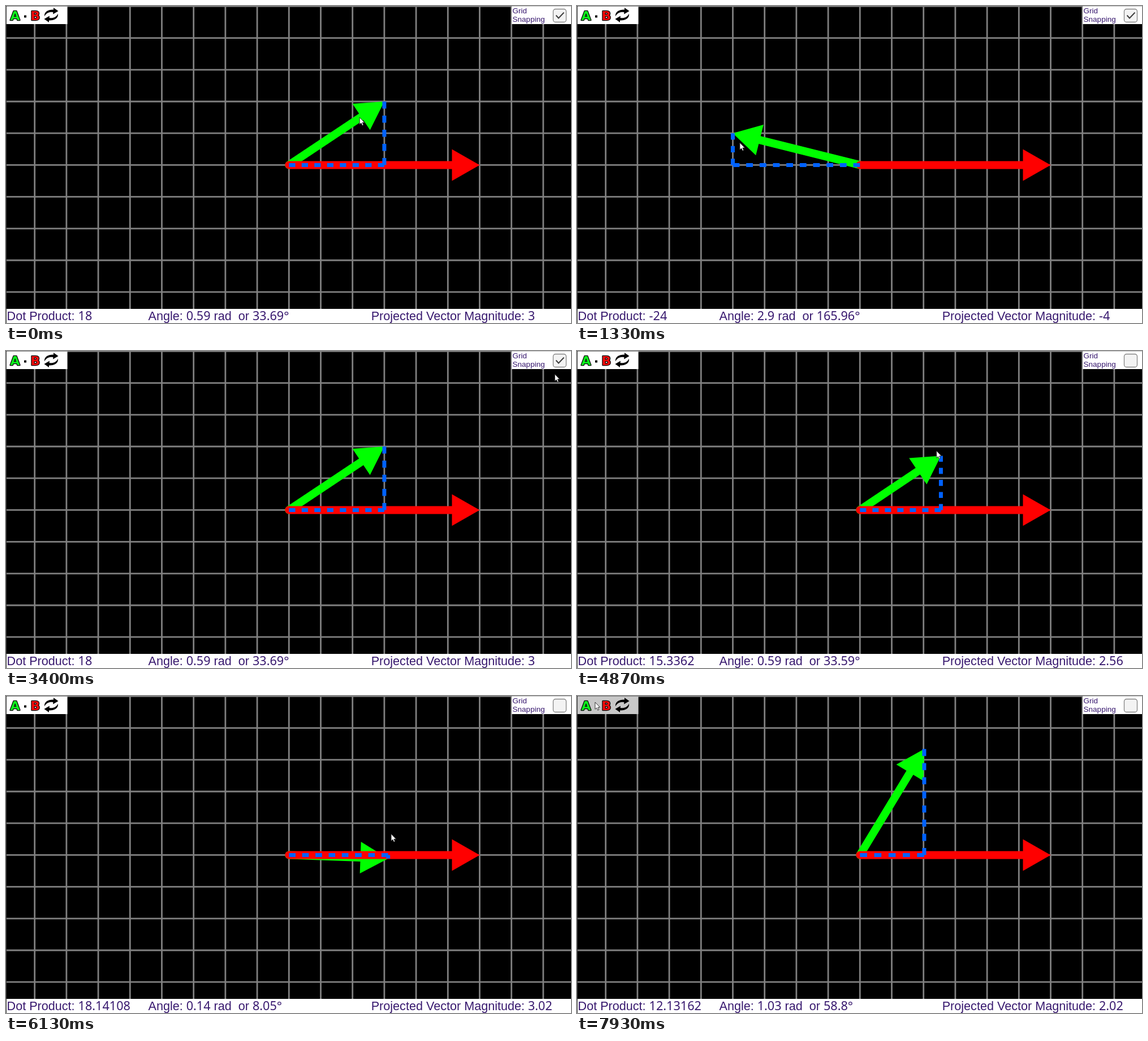
These frames come from a looping animation (999x561 px, 8 s). An HTML page with a canvas:

```html
<!DOCTYPE html>
<html lang="en">
<head>
<meta charset="utf-8">
<title>Dot product</title>
<style>
  html, body { margin: 0; width: 100%; height: 100%; overflow: hidden; background: #000; }
  canvas { display: block; }
</style>
</head>
<body>
<canvas id="stage" width="999" height="561"></canvas>
<script>
const ctx = document.getElementById('stage').getContext('2d');
const W = 999, H = 561, LOOP = 8000, STEP = 200 / 3;
const CX = 500.3, CY = 281.4, U = 56.2, B_LEN = 6;
const INK = '#38196f', BLUE = '#0062ff', GRID = '#808080';
const LAG = 60, TEXT_LAG = 85;
const GRAB = 400, UNCHECK = 3670, REGRAB = 4470;

const mix = (a, b, s) => a + (b - a) * s;
const clamp = (v, lo, hi) => Math.min(Math.max(v, lo), hi);
const smooth = s => s * s * (3 - 2 * s);
const rad = deg => deg * Math.PI / 180;
const polar = (deg, r) => [CX + r * Math.cos(rad(deg)), CY - r * Math.sin(rad(deg))];

// Angle and radius of the vector with a given dot product
const spot = (dot, deg) => [deg, dot / B_LEN * U / Math.cos(rad(deg))];

// Monotone cubic through keys [time, value, value]: still at both ends
function curve(keys, t, k) {
  const slope = i => {
    if (i === 0 || i === keys.length - 1) return 0;
    const [p, q, r] = keys.slice(i - 1, i + 2);
    const a = (q[k] - p[k]) / (q[0] - p[0]), b = (r[k] - q[k]) / (r[0] - q[0]);
    return a * b <= 0 ? 0 : 2 * a * b / (a + b);
  };
  let i = 0;
  while (i < keys.length - 2 && keys[i + 1][0] <= t) i++;
  const p = keys[i], q = keys[i + 1], h = q[0] - p[0], s = (t - p[0]) / h;
  return mix(p[k], q[k], smooth(s)) +
    h * s * (1 - s) * (slope(i) * (1 - s) - slope(i + 1) * s);
}

// Pointer moves: straight or bowed glides, and drags around the centre
const glide = (from, to, end, bow = 0) => ({
  from,
  run(t, pos) {
    const s = smooth(Math.min((t - from) / (to - from), 1));
    return [mix(pos[0], end[0], s), mix(pos[1], end[1], s) + bow * Math.sin(Math.PI * s)];
  }
});
const orbit = (...keys) => ({
  from: keys[0][0],
  run(t) {
    const at = Math.min(t, keys[keys.length - 1][0]);
    return polar(curve(keys, at, 1), curve(keys, at, 2));
  }
});

const HOME = [625.2, 197.2];
const LOOSE = spot(15.3362, 33.59);
const moves = [
  glide(60, 200, polar(34, 171)),
  orbit([340, 34, 171], [1330, 169.5, 216], [2200, 321.5, 198], [2800, 395.7, 214]),
  glide(2940, 3200, [968, 48]),
  glide(3340, 3530, [978, 18]),
  glide(3740, 4200, [626, 169]),
  glide(4210, 4330, [645, 182]),
  glide(4400, 4510, polar(...LOOSE)),
  orbit([4790, ...LOOSE], [5585, ...spot(-7.668098, 234.81)], [6510, ...spot(12.13162, 418.8)]),
  glide(6810, 7670, [32, 11], 245)
];
function pointer(t) {
  let pos = HOME;
  for (const m of moves) if (t > m.from) pos = m.run(t, pos);
  return pos;
}

// Vector A in grid units
function vectorAt(t, lag) {
  if (t < GRAB) return [3, 2];
  const free = t >= REGRAB;
  const [px, py] = pointer(free ? Math.min(t - lag, 6520) : Math.min(t, 2860));
  const v = [(px - CX) / U, (CY - py) / U];
  return free ? v : v.map(Math.round);
}

function line(x1, y1, x2, y2) {
  ctx.beginPath();
  ctx.moveTo(x1, y1);
  ctx.lineTo(x2, y2);
  ctx.stroke();
}
function poly(points, color) {
  ctx.beginPath();
  points.forEach(p => ctx.lineTo(...p));
  ctx.closePath();
  ctx.fillStyle = color;
  ctx.fill();
}

function grid() {
  ctx.fillStyle = '#000';
  ctx.fillRect(0, 0, W, H);
  ctx.strokeStyle = GRID;
  ctx.lineWidth = 2.8;
  for (let i = -8; i <= 8; i++) line(CX + i * U, 0, CX + i * U, H);
  for (let i = -5; i <= 4; i++) line(0, CY + i * U, W, CY + i * U);
}

function arrow(x, y, color) {
  const len = Math.hypot(x, y) * U, neck = len - 49;
  ctx.save();
  ctx.translate(CX, CY);
  ctx.rotate(-Math.atan2(y, x));
  ctx.strokeStyle = color;
  ctx.lineWidth = 14;
  ctx.beginPath();
  ctx.arc(0, 0, 7, 0, 7);
  ctx.fillStyle = color;
  ctx.fill();
  line(0, 0, Math.max(neck, 0) + 1, 0);
  poly([[neck, -28], [len, 0], [neck, 28]], color);
  ctx.restore();
}

// Dashes fill the length so that both ends carry a dash
function dashes(x1, y1, x2, y2) {
  const len = Math.hypot(x2 - x1, y2 - y1);
  if (len < 0.5) return;
  const dash = len / (2 * Math.floor(len / 23.6) + 1);
  ctx.strokeStyle = BLUE;
  ctx.lineWidth = 7;
  ctx.setLineDash([dash, dash]);
  line(x1, y1, x2, y2);
  ctx.setLineDash([]);
}

// Letters and figures use two typefaces
function caption(text, x) {
  ctx.fillStyle = INK;
  for (const run of text.match(/[\d.°-]+|[^\d.°-]+/g)) {
    ctx.font = '21.6px ' + (/\d/.test(run) ? '"Noto Sans", "Open Sans"' : '"Liberation Sans", Arial') + ', sans-serif';
    ctx.fillText(run, x, 556);
    x += ctx.measureText(run).width;
  }
}
const short = v => Number(v.toFixed(2));

function readout([x, y]) {
  ctx.fillStyle = '#fff';
  ctx.fillRect(0, 536, W, 25);
  const angle = Math.atan2(Math.abs(y), x);
  caption(`Dot Product: ${Number((x * B_LEN).toPrecision(7))}`, 1.6);
  caption(`Angle: ${short(angle)} rad  or ${short(angle * 180 / Math.PI)}°`, 251.5);
  caption(`Projected Vector Magnitude: ${short(x)}`, 645.7);
}

function letter(ch, x, color) {
  ctx.font = 'bold 22px "DejaVu Sans", sans-serif';
  ctx.lineJoin = 'round';
  ctx.lineWidth = 2.4;
  ctx.strokeStyle = '#000';
  ctx.strokeText(ch, x, 25);
  ctx.fillStyle = color;
  ctx.fillText(ch, x, 25);
}

function swapIcon() {
  for (const turn of [0, Math.PI]) {
    ctx.save();
    ctx.translate(80, 16);
    ctx.rotate(turn);
    ctx.beginPath();
    ctx.moveTo(-12, 2.5);
    ctx.bezierCurveTo(-13, -6, -5, -10, 4, -9.5);
    ctx.lineTo(4, -13);
    ctx.lineTo(12.5, -7);
    ctx.lineTo(3, -1.5);
    ctx.lineTo(3.4, -5);
    ctx.bezierCurveTo(-3, -6, -9, -4, -12, 2.5);
    ctx.fillStyle = '#000';
    ctx.fill();
    ctx.restore();
  }
}

function modeButton(t) {
  const tone = Math.round(mix(255, 200, clamp((t - 7670) / 260, 0, 1)));
  ctx.fillStyle = `rgb(${tone},${tone},${tone})`;
  ctx.fillRect(1, 1, 107.5, 31);
  letter('A', 7.5, '#0cf01c');
  letter('B', 43.5, '#f00c0c');
  ctx.fillStyle = '#000';
  ctx.fillRect(32, 16.5, 4, 4);
  swapIcon();
}

function snapPanel(t) {
  ctx.fillStyle = '#fff';
  ctx.fillRect(894.2, 0.5, 104.8, 31.5);
  ctx.fillStyle = INK;
  ctx.font = '13.5px "Liberation Sans", Arial, sans-serif';
  ctx.fillText('Grid', 895.6, 13);
  ctx.fillText('Snapping', 895.6, 28);
  ctx.beginPath();
  ctx.roundRect(967.5, 5.5, 23, 23, 4);
  ctx.fillStyle = t >= 3470 && t < REGRAB ? '#e9e9e9' : '#f3f3f3';
  ctx.fill();
  ctx.strokeStyle = '#858585';
  ctx.lineWidth = 1.3;
  ctx.stroke();
  if (t >= UNCHECK) return;
  ctx.beginPath();
  ctx.moveTo(972.5, 16.5);
  ctx.lineTo(977, 21.5);
  ctx.lineTo(986.5, 11.5);
  ctx.strokeStyle = '#3c3c3c';
  ctx.lineWidth = 1.9;
  ctx.lineJoin = 'miter';
  ctx.stroke();
}

function cursor([x, y]) {
  ctx.save();
  ctx.translate(x, y);
  poly([[0, 0], [0, 12.4], [2.8, 9.9], [4.7, 14.2], [6.8, 13.3], [4.9, 9.1], [8.7, 9]], '#fff');
  ctx.strokeStyle = '#222';
  ctx.lineWidth = 0.9;
  ctx.stroke();
  ctx.restore();
}

function draw(t) {
  const [x, y] = vectorAt(t, LAG);
  const px = CX + x * U, py = CY - y * U;
  grid();
  arrow(x, y, '#00ff00');
  arrow(B_LEN, 0, '#ff0000');
  dashes(CX, CY, px, CY);
  dashes(px, CY, px, py);
  readout(vectorAt(t, TEXT_LAG));
  modeButton(t);
  snapPanel(t);
  ctx.fillStyle = '#333';
  ctx.fillRect(0, 0, 1, H);
  cursor(pointer(t));
}

// The picture advances 15 times a second
const t0 = performance.now();
function tick() {
  const t = (performance.now() - t0) % LOOP;
  const n = Math.min(Math.floor((t + 3.4) / STEP), 119);
  draw(Math.round(n * STEP / 10) * 10);
  requestAnimationFrame(tick);
}
tick();
</script>
</body>
</html>
```
